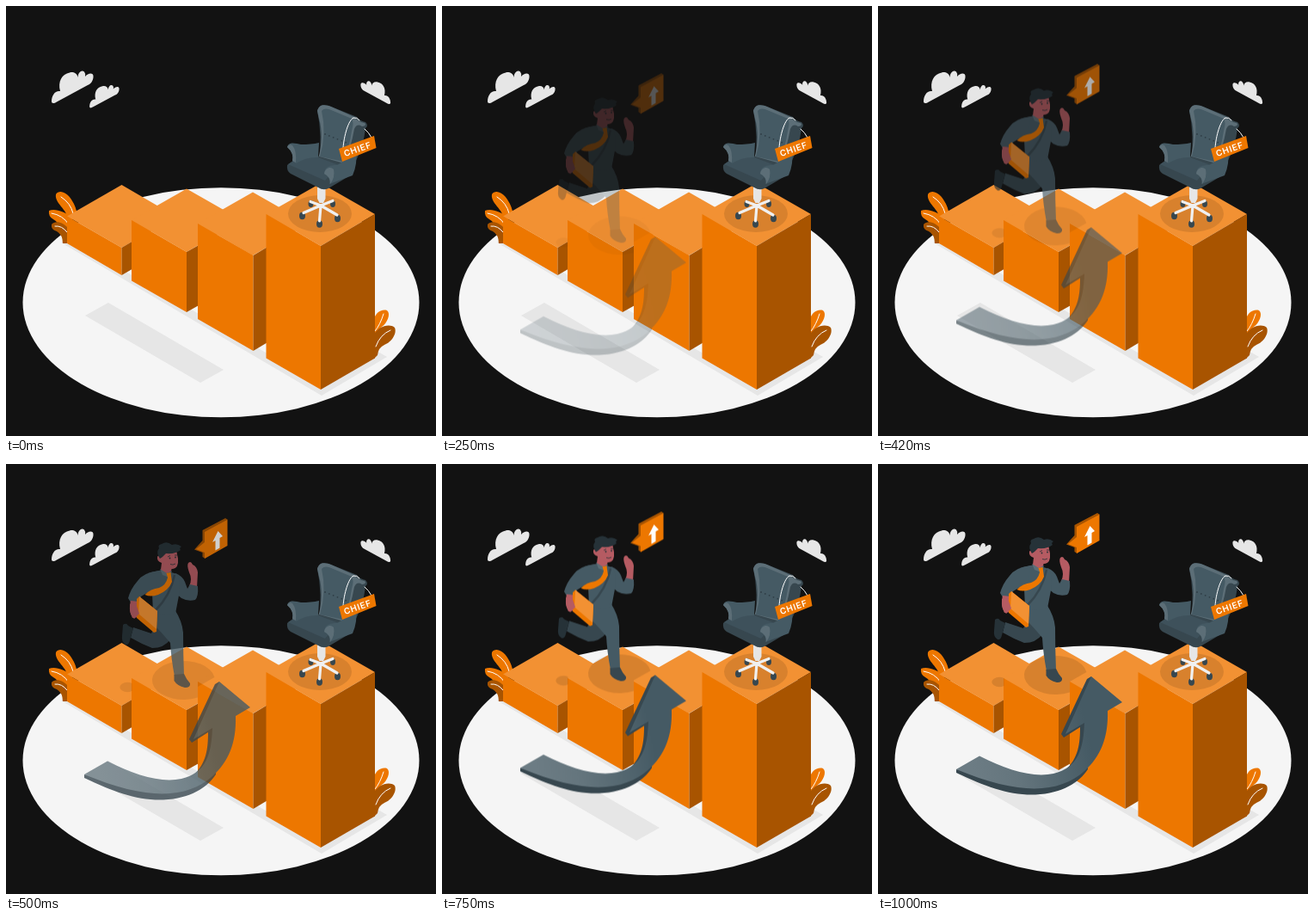
Write an HTML page without scripts that moves like this. It is 500 px wide and 500 px high and loops after 1040 ms.

```html
<!DOCTYPE html>
<html lang="en">
<head>
<meta charset="utf-8">
<title>Career steps</title>
<style>
html, body { margin: 0; width: 100%; height: 100%; overflow: hidden; background: #121212; }
svg { display: block; width: 100%; height: 100%; }
.top { fill: #f29133; }
.front { fill: #ed7700; }
.side { fill: #a85400; }
.pale { fill: #e6e6e6; }
.suit { fill: #455a64; }
.deep { fill: #37474f; }
.ink { fill: #263238; }
.rim { fill: #5c6e77; }
.skin { fill: #b55b62; }
.shade { fill: #000; fill-opacity: .11; }
.line { fill: none; stroke: #fff; stroke-width: 1; stroke-linecap: round; }
.leg { fill: none; stroke: #f0f0f0; stroke-width: 3.2; stroke-linecap: round; }
.sign { font: 600 10px Inter, "Open Sans", sans-serif; letter-spacing: .8px; fill: #fff; text-anchor: middle; }
.rise { animation: rise 1040ms infinite; }
@keyframes rise {
  0% { opacity: 0; transform: translateY(30px); animation-timing-function: cubic-bezier(.3, -.01, .47, 1.38); }
  96.15%, 100% { opacity: 1; transform: none; }
}
</style>
</head>
<body>
<svg viewBox="0 0 500 500">
  <defs>
    <linearGradient id="sweep" gradientUnits="userSpaceOnUse" x1="110" y1="350" x2="245" y2="320">
      <stop offset="0" stop-color="#6c7c84"/>
      <stop offset=".35" stop-color="#64757d"/>
      <stop offset="1" stop-color="#455a64"/>
    </linearGradient>
    <path id="cloud" d="M53 111C53 104 57 98 63 99C60 88 65 79 74 77.500C79 76 83 79 83.500 83C84 77 88 74 91 76.500Q93 79 92 82C95 78 101 77 101.500 81C102 87 98 91 95 92L59 111.500C55 114 53 113 53 111Z"/>
  </defs>

  <ellipse cx="250" cy="344.800" rx="230.500" ry="133.500" fill="#f5f5f5"/>
  <g class="pale">
    <use href="#cloud"/>
    <use href="#cloud" transform="translate(59.500 38.200) scale(.71)"/>
    <use href="#cloud" transform="translate(485 33.200) scale(-.715 .715)"/>
    <path d="M119 345L92 360L226 438L253 423Z"/>
    <path d="M64 275L367 453L443 408L429 400L366 440L72 270Z"/>
  </g>

  <!-- plants -->
  <path class="front" d="M58 219C62 213 71 217 76 225Q82 234 83 244L70 252C76 238 56 231 58 219Z"/>
  <path class="front" d="M50 238C57 235 68 239 77 246L73 262H66Q60 250 55 248Q49 245 50 238Z"/>
  <path class="side" d="M53 254C57 249 66 251 72 258V276H66Q66 266 59 262Q52 260 53 254Z"/>
  <path class="line" d="M64 222Q75 229 78 241M53 241Q66 243 73 254M57 256Q65 255 71 263"/>
  <path class="front" d="M428 366C428 358 436 352 443 354C448 358 443 369 437 373L428 384Z"/>
  <path class="side" d="M428 410V382C432 374 445 368 452 374C455 381 448 391 440 394Q433 397 432 406Z"/>
  <path class="line" d="M439 358Q435 371 429 378M447 377Q435 382 430 396"/>

  <!-- steps -->
  <path class="top" d="M134.500 208L71 244.500L134.500 281L198 245Z"/>
  <path class="front" d="M71 244.500L134.500 281V313L71 276Z"/>
  <path class="side" d="M134.500 281L150 272V304L134.500 313Z"/>
  <path class="top" d="M210 212.500L146 249L210 286L274 249Z"/>
  <path class="front" d="M146 249L210 286V356L146 319.500Z"/>
  <path class="side" d="M210 286L226 277V347L210 356Z"/>
  <path class="top" d="M287 216.500L223 253L287 290L351 253Z"/>
  <path class="front" d="M223 253L287.500 290V401L223 364Z"/>
  <path class="side" d="M287.500 290L306 279V390L287.500 401Z"/>
  <path class="top" d="M366 206L302.500 242L366 279L429 242Z"/>
  <path class="front" d="M302.500 242L366 279V446L302.500 409.500Z"/>
  <path class="side" d="M366 279L429 242V409.500L366 446Z"/>

  <!-- chair -->
  <ellipse class="shade" cx="365" cy="241.500" rx="37" ry="21.500"/>
  <g class="deep">
    <ellipse cx="354.500" cy="230" rx="3" ry="4"/>
    <ellipse cx="380" cy="230" rx="3" ry="4"/>
    <ellipse cx="344.500" cy="244" rx="3.500" ry="4.200"/>
    <ellipse cx="364.500" cy="253.500" rx="3.500" ry="4.200"/>
    <ellipse cx="385.500" cy="247" rx="3.500" ry="4.200"/>
  </g>
  <path class="leg" d="M366 232L346 240.500M366 232L364.500 250M366 232L385 243M366 232L354 227.500M366 232L380 226.500"/>
  <path d="M362 210H371.500V224L369 229H364.500L362 224Z" fill="#e6e6e6"/>
  <path class="deep" d="M362 122C364 114 370 114 378 117L408 129Q412 134 418 135Q422 139 418 142Q416 162 406 182L394 200L364 184Q368 150 362 122Z"/>
  <path class="rim" d="M362 122C364 114 371 114 379 117.500L405 129Q410 135 417 136Q420 139 414 140Q408 136 405 143Q401 165 393 185L363 178Q370 151 364 131Z"/>
  <path class="suit" d="M367 122Q370 118 377 120.500L402 131Q405 135 402 145Q399 166 392 181L365 175Q373 148 367 122Z"/>
  <path d="M371 149L396 159" stroke="#2f3e46" stroke-width="1.800" stroke-linecap="round" stroke-dasharray="0 5.200" fill="none"/>
  <path class="deep" d="M327 185Q343 171 361 174L397 184V199L375 212Q369 215 363 211L331 195Q326 192 327 185Z"/>
  <path d="M328 184Q344 173 360 175L387 185L371 203Z" fill="#3e515b"/>
  <path class="suit" d="M327 164C329 157 337 160 343 161Q355 161 364 159L363 176Q350 175 337 183L333 180Q335 171 327 164Z"/>
  <path class="rim" d="M327 164Q329 160 333 162Q338 168 337 182L333 180Q335 171 327 164Z"/>
  <path class="suit" d="M370 195C370 187 377 185 385 185Q395 181 402 164L407 166Q409 184 403 197L376 207Q378 200 370 195Z"/>
  <path class="rim" d="M370 195C371 188 378 186 381 190Q383 199 377 207Q378 199 370 195Z"/>
  <path class="line" d="M392 165C393 151 398 133 404 130Q408 129 411 133M417 143Q422 147 425 153"/>
  <path class="front" d="M387 166L428 151L430.500 165L391 181Z"/>
  <text class="sign" transform="translate(410 169.800) rotate(-19)">CHIEF</text>

  <g class="rise">
    <path class="shade" d="M242.500 242L223 253V265.500A36.500 22.500 0 1 1 242.500 242Z"/>
    <path class="shade" d="M146.500 249V258A9 5.500 0 1 1 146.500 249Z"/>

    <!-- big arrow -->
    <path class="deep" d="M91 355V359C125 375 152 385.500 183 384.500C215 383 234 370 244 355L248 247L243 250L213 314L216 318L235 306C235 325 233 342 218 356L180 372Z"/>
    <path d="M91 355L118 339.500C150 356 180 365 204 360C233 353 239 331 240 301L218 314L248 247L284 277L267 287C268 318 259 340 240 357C211 383 165 386 91 355Z" fill="url(#sweep)"/>

    <!-- speech bubble -->
    <path class="side" d="M228.500 71L255 57L257.500 58.500L231.500 74V104L228.500 102V97L219 93.500L228.500 83Z"/>
    <path class="front" d="M231 73L257.500 58.500V89L231 104V97L221 93L231 85Z"/>
    <path d="M246.500 72L252 78L248.500 80V91.500L243.500 94.500V83L240 85Z" fill="#fff"/>

    <!-- runner -->
    <path class="deep" d="M178 172L191 198Q184 208 170 208Q157 203 145 196L148 184L169 191Z"/>
    <path class="ink" d="M136 181Q140 178 142 182L148 185L144 199Q143 205 139 204Q134 201 135 194Z"/>
    <path class="suit" d="M172 162L196 163Q205 177 206 190Q206 215 207 240L196 241Q192 220 191 202Q181 190 173 182Z"/>
    <path class="deep" d="M195.500 239L207 238Q210 245 214 249Q215 254 208 254Q199 252 195.500 246Z"/>
    <path class="skin" d="M213 136Q217 128 213 120Q210 112 212 109Q215 106 217 111Q222 113 223 120L222 138Z"/>
    <path class="suit" d="M197 121Q205 124 208 131L211 139L214 134L223 136Q224 148 220 152Q211 154 204 150L196 143Z"/>
    <path class="suit" d="M165 121L182 117L199 122Q204 134 201 147L197 168Q184 173 171 166L170 145Z"/>
    <path class="suit" d="M178 118Q160 120 153 130Q145 139 142 150L145 155L154 156L157 148L174 138Z"/>
    <path class="skin" d="M145 153L154 154Q156 163 154 172L147 173Q142 164 145 153Z"/>
    <path d="M196 123Q191 147 174 164" fill="none" stroke="#37474f" stroke-width="2.500"/>
    <path class="skin" d="M181 109L194 112L191 121L186 123L180 117Z"/>
    <path class="rim" d="M179 116L187 121L193 118L190 126L182 123Z"/>
    <path class="front" d="M186.500 121L191.500 120L192 124L193 131Q189 141 177 146Q168 149 161.500 146Q168 139 178 138Q186 135 188 126Z"/>
    <path class="front" d="M152 151L155 148L176 165L175 189L172 190L152 173Z"/>
    <path class="top" d="M155 148L176 165L175 186L154 168Z"/>
    <path class="skin" d="M144 157Q151 155 153 162L155 168L149 174Q143 169 144 157Z"/>
    <path class="skin" d="M179 98L198 94L200 104Q201 115 194 116Q185 116 181 109Q175 107 176 102Q177 99 181 103Z"/>
    <path class="ink" d="M179 104Q174 97 178 92Q176 88 181 87Q187 83 193 88Q199 86 204 90Q201 92 203 94Q197 99 186 98L182 102Z"/>
    <path d="M188 102L191 100.500M196 100H199M191 110.500Q194 112 197 110" fill="none" stroke="#263238" stroke-width=".8"/>
    <circle class="ink" cx="190.500" cy="103.500" r=".9"/>
    <circle class="ink" cx="197" cy="102.500" r=".9"/>
  </g>
</svg>
</body>
</html>
```
